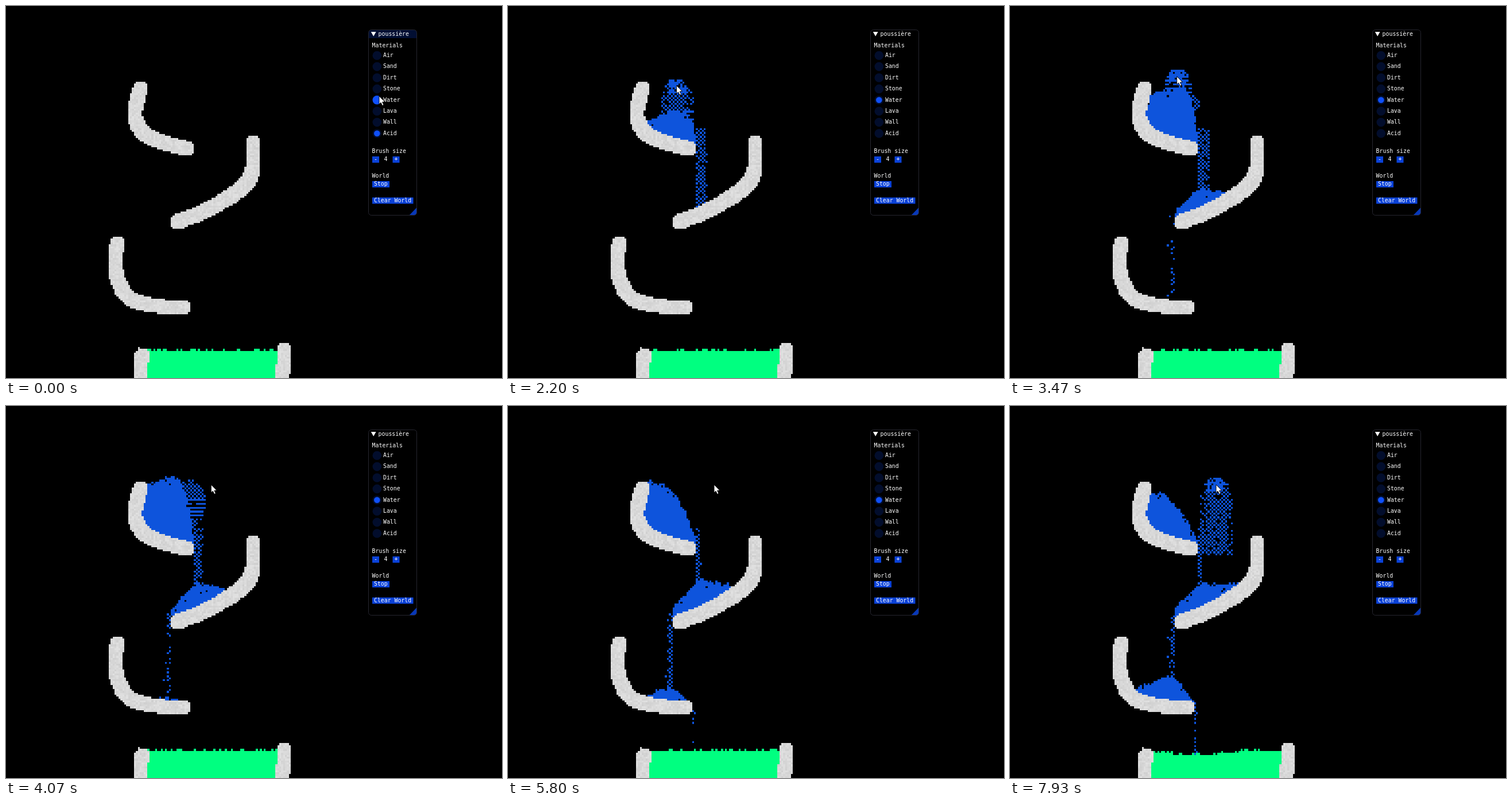
Animation, 864 px wide and 648 px high, one loop 8000 ms. Source, as an HTML page with a canvas:

```html
<!DOCTYPE html>
<html lang="en">
<head>
<meta charset="utf-8">
<title>Falling sand</title>
<style>
  html, body { margin: 0; width: 100%; height: 100%; overflow: hidden; background: #000; }
  canvas { display: block; }
</style>
</head>
<body>
<canvas id="stage" width="864" height="648"></canvas>
<script>
const ctx = document.getElementById('stage').getContext('2d');
const CELL = 3.375, COLS = 256, ROWS = 192, LOOP = 8000;
const STEPS = 0.015; // simulation steps per ms
const FALL = 8;      // rows per step
const WATER = '#0e54dc', ACID = '#00ff80', BUTTON = '#0b42d8', BORDER = '#26262f';

const clamp = (v, lo = 0, hi = 1) => Math.min(hi, Math.max(lo, v));
const bell = (t, mid, width) => Math.exp(-(((t - mid) / width) ** 2));

function hash(a, b = 0, c = 0) {
  let h = Math.imul(a + 101, 374761393) ^ Math.imul(b + 57, 668265263) ^ Math.imul(c + 13, 1274126177);
  h = Math.imul(h ^ (h >>> 13), 1103515245);
  h = Math.imul(h ^ (h >>> 15), 2246822519);
  return ((h ^ (h >>> 16)) >>> 0) / 4294967296;
}

// keys: [time, ...values], linear in between
function at(keys, t) {
  let i = 0;
  while (i < keys.length - 2 && t >= keys[i + 1][0]) i++;
  const a = keys[i], b = keys[i + 1];
  const k = clamp((t - a[0]) / (b[0] - a[0]));
  return a.slice(1).map((v, j) => v + (b[j + 1] - v) * k);
}

function cell(g, c, r, color, rows = 1) {
  const x = Math.round(c * CELL), y = Math.round(r * CELL);
  g.fillStyle = color;
  g.fillRect(x, y, Math.round((c + 1) * CELL) - x, Math.round((r + rows) * CELL) - y);
}

// Walls: a round brush dragged along smooth curves, in cells
const solid = new Uint8Array(COLS * ROWS);
const isWall = (c, r) => solid[r * COLS + c];

function stamp(x, y) {
  for (let dy = -3; dy <= 3; dy++)
    for (let dx = -3; dx <= 3; dx++)
      if (dx * dx + dy * dy < 16 && y + dy < ROWS) solid[(y + dy) * COLS + x + dx] = 1;
}

function spline(a, b, c, d, k) {
  return b + 0.5 * k * (c - a + k * (2 * a - 5 * b + 4 * c - d + k * (3 * (b - c) + d - a)));
}

function stroke(...pts) {
  const p = i => pts[clamp(i, 0, pts.length - 1)];
  for (let i = 0; i < pts.length - 1; i++)
    for (let k = 0; k <= 1; k += 0.04) {
      const [x, y] = [0, 1].map(j => Math.round(spline(p(i - 1)[j], p(i)[j], p(i + 1)[j], p(i + 2)[j], k)));
      stamp(x, y);
    }
  stamp(...pts[pts.length - 1]);
}

stroke([69, 42], [67, 49], [66, 57], [71, 65.5], [81, 70], [93, 73]);
stroke([127, 70], [127, 81], [125, 89], [117, 96.5], [102, 105.3], [88, 111]);
stroke([57, 122], [56, 129], [57, 140], [63, 150], [75, 154], [91, 155]);
stroke([70, 180], [69, 184], [69, 195]);
stroke([143, 177], [143, 185], [142, 189], [142, 195]);
solid[176 * COLS + 68] = 1;

const walls = document.createElement('canvas');
walls.width = 864;
walls.height = 648;
const wallCtx = walls.getContext('2d');
for (let r = 0; r < ROWS; r++)
  for (let c = 0; c < COLS; c++)
    if (isWall(c, r)) {
      const v = Math.round(207 + hash(c, r) * 18);
      cell(wallCtx, c, r, `rgb(${v},${v},${v})`);
    }

// Pools: hills in px with a peak, the heights of both ends and the bend of each side
const upperKeys = [ // time, peak x, peak y, drop to the left end, right bend
  [1130, 284, 240, 8, 4], [1470, 284, 209, 25, 4], [2870, 297, 157, 19, 3.7], [4070, 290, 123, 20, 2.5],
  [5800, 246, 132, 0, 2.5], [7000, 266, 145, 2, 1.85], [7930, 262, 150, 2, 1.5]
];

const pools = [
  { from: 70, to: 96, base: 80, left: 240, right: 328, start: 1130, hill(t) {
    const [x, y, drop, bend] = at(upperKeys, t);
    return { x, y, yl: y + drop, yr: 234, bl: 1.6, br: bend };
  } },
  { from: 85, to: 118, base: 116, left: 284, right: 392, start: 1900, hill(t) {
    const k = Math.exp((2870 - t) / 900);
    const y = 300 + 31 * k + Math.max(0, t - 5800) * 0.004;
    return { x: 336, y, yl: 357 + 9 * k, yr: 310 + 26 * Math.exp((2870 - t) / 1500), bl: 1.2, br: 1 };
  } },
  { from: 65, to: 94, base: 160, left: 220, right: 322, start: 3300, hill(t) {
    const y = 507 - 0.0101 * (t - 4070);
    return { x: 280, y, yl: y + 25, yr: 520, bl: 1.1, br: 1.2 };
  } }
];

function surface(p, h, x) {
  const u = x < h.x ? (h.x - x) / (h.x - p.left) : (x - h.x) / (p.right - h.x);
  const [end, bend] = x < h.x ? [h.yl, h.bl] : [h.yr, h.br];
  return h.y + (end - h.y) * clamp(u) ** bend;
}

// First row of the wall that carries a column
function bed(c, base) {
  let r = base;
  while (!isWall(c, r)) r--;
  while (isWall(c, r - 1)) r--;
  return r;
}

function drawPool(p, t, n) {
  if (t < p.start) return;
  const h = p.hill(t);
  for (let c = p.from; c <= p.to; c++) {
    const rough = hash(c, n >> 1, p.left);
    const shift = rough < 0.2 ? 1 : rough > 0.85 ? -1 : 0;
    const top = Math.round(surface(p, h, (c + 0.5) * CELL) / CELL) + shift;
    for (let r = top, end = bed(c, p.base); r < end; r++) {
      const hole = r > top && r < top + 4 && hash(c, r, n >> 1) < 0.04;
      if (!hole) cell(ctx, c, r, WATER);
    }
  }
}

// Falling droplets: a checkered pattern that scrolls down
function fall(col, weights, top, start, t, n) {
  const front = Math.min(183, top + Math.floor((t - start) * STEPS * FALL));
  weights.forEach((w, i) => {
    const c = col + i;
    for (let r = top; r < front && !isWall(c, r); r++) {
      const u = r - FALL * n;
      if (((c + u) & 1) === 0 && hash(c, u, 7) < w) cell(ctx, c, r, WATER);
    }
  });
}

function drawStreams(t, n) {
  const width = 2 + 4.5 * bell(t, 2870, 1500);
  fall(97, [0, 1, 2, 3, 4, 5, 6].map(i => 0.9 * clamp(width - i)), 63, 1700, t, n);
  const mid = Math.min(0.95, 0.25 + (t - 2700) / 4400);
  fall(81, [0.1, 0.3, 0.8, 0.95].map(w => w * mid), 107, 2720, t, n);
  const low = Math.min(0.85, 0.3 + (t - 5600) / 2500);
  fall(95, [low, low / 4], 153, 5620, t, n);
}

// Bands of checks and dashes
function lattice(c, r, n) {
  const u = r - FALL * n;
  if (hash(Math.floor(u / 10), 3) < 0.5) return ((c + u) & 1) === 0 && hash(c, u) < 0.92;
  return (u & 1) === 0 && hash(c >> 1, u) < 0.78;
}

const pointer = [
  [300, 650, 157], [900, 292, 143], [1250, 290, 146], [1470, 303, 148],
  [2870, 285, 130], [3600, 292, 121], [3950, 357, 137], [4700, 359, 137]
];

function pour(t, n, first, last) {
  if (n < first || n > last) return;
  const [px, py] = at(pointer, t).map(v => Math.floor(v / CELL));
  const end = py - 3 + FALL * (n - first);
  for (let c = px - 13; c <= px + 9; c++)
    for (let r = py - 3; r < end && !isWall(c, r); r++) {
      const d = r - py;
      const lag = Math.max(0, d) / FALL / STEPS;
      const off = Math.abs(c - Math.floor(at(pointer, t - lag)[0] / CELL));
      const half = d < 0 ? 6 + d : Math.min(8, 6 + d / 3);
      if (off > half || (off > 5 && hash(c, r, n) > 0.7)) continue;
      if (d < 4 && off < 5 ? hash(c, r, n) < 0.8 : lattice(c, r, n)) cell(ctx, c, r, WATER);
    }
}

// Water rolling over the right side of the upper pool
function spill(t, n) {
  const size = 1.15 * bell(t, 4000, 450) - 0.15;
  for (let r = 38; r < 64; r++)
    for (let c = 88; c < 105; c++) {
      const x = (c - 94) / 9, y = (r - 50) / 13;
      if (x * x + y * y < size && lattice(c, r, n)) cell(ctx, c, r, WATER);
    }
}

function drawAcid(t, n) {
  const k = Math.max(0, (t - 5600) / 2330);
  for (let c = 72; c < 141; c++) {
    const dip = 2.3 * k ** 0.7 * bell(c, 95, 8 + 10 * k);
    const ripple = c > 72 && hash(c, n >> 1, 5) < 0.32 ? 1 : 0;
    const top = 178 + Math.round(dip) - ripple;
    cell(ctx, c, top, ACID, ROWS - top);
  }
}

function label(text, x, y) {
  ctx.fillStyle = '#fff';
  ctx.fillText(text, x, y);
}

function button(text, x, y, w) {
  ctx.fillStyle = BUTTON;
  ctx.fillRect(x, y, w, 11);
  label(text, x + 3, y + 5.8);
}

function poly(points, fill) {
  ctx.beginPath();
  points.forEach(([x, y]) => ctx.lineTo(x, y));
  ctx.closePath();
  ctx.fillStyle = fill;
  ctx.fill();
}

function dot(x, y, r, fill) {
  ctx.beginPath();
  ctx.arc(x, y, r, 0, Math.PI * 2);
  ctx.fillStyle = fill;
  ctx.fill();
}

const materials = ['Air', 'Sand', 'Dirt', 'Stone', 'Water', 'Lava', 'Wall', 'Acid'];
const frame = new Path2D();
frame.roundRect(631.5, 41.5, 84, 323, 5);

function drawPanel(n) {
  const pressed = n < 2, active = n < 15;
  ctx.font = '9.85px "DejaVu Sans Mono", "Liberation Mono", monospace';
  ctx.textBaseline = 'middle';
  ctx.fillStyle = '#000';
  ctx.fill(frame);
  ctx.save();
  ctx.clip(frame);
  if (active) {
    ctx.fillStyle = '#020f33';
    ctx.fillRect(631, 41, 86, 15);
  }
  poly([[716, 350.5], [716, 365], [702, 365]], '#0838b8');
  ctx.restore();
  ctx.strokeStyle = BORDER;
  ctx.lineWidth = 1;
  ctx.stroke(frame);

  poly([[635.8, 45], [644.6, 45], [640.2, 52.8]], '#fff');
  label('poussière', 648.6, 49.3);
  label('Materials', 637.6, 69.5);
  const chosen = pressed ? 'Acid' : 'Water';
  materials.forEach((name, i) => {
    const y = 86.2 + i * 19.4;
    dot(646.3, y, 7.8, pressed && name === 'Water' ? '#0f50ff' : '#020d2c');
    if (name === chosen) dot(646.3, y, 5.3, '#0f50fa');
    label(name, 657, y + 0.3);
  });
  label('Brush size', 637.6, 253.5);
  button('-', 638, 262, 12);
  label('4', 658.4, 267.8);
  button('+', 673.5, 262, 12);
  label('World', 637.6, 296.5);
  button('Stop', 638, 305, 30);
  button('Clear World', 638, 333.5, 71.5);
}

function drawPointer(t) {
  const [x, y] = at(pointer, t);
  const shape = [[0, 0], [0, 14], [3, 11.2], [5.5, 16.5], [8, 15.4], [5.6, 10.3], [9.8, 10]];
  poly(shape.map(([px, py]) => [x + px, y + py]), '#fff');
  ctx.strokeStyle = '#000';
  ctx.lineWidth = 0.9;
  ctx.stroke();
}

function draw(ms) {
  const n = Math.floor(ms * STEPS + 0.1);
  const t = n / STEPS;
  ctx.fillStyle = '#000';
  ctx.fillRect(0, 0, 864, 648);
  drawStreams(t, n);
  spill(t, n);
  pour(t, n, 16, 54);
  pour(t, n, 114, 120);
  pools.forEach(p => drawPool(p, t, n));
  drawAcid(t, n);
  ctx.drawImage(walls, 0, 0);
  drawPanel(n);
  drawPointer(t);
}

const begin = performance.now();
function tick() {
  draw((performance.now() - begin) % LOOP);
  requestAnimationFrame(tick);
}
tick();
</script>
</body>
</html>
```
